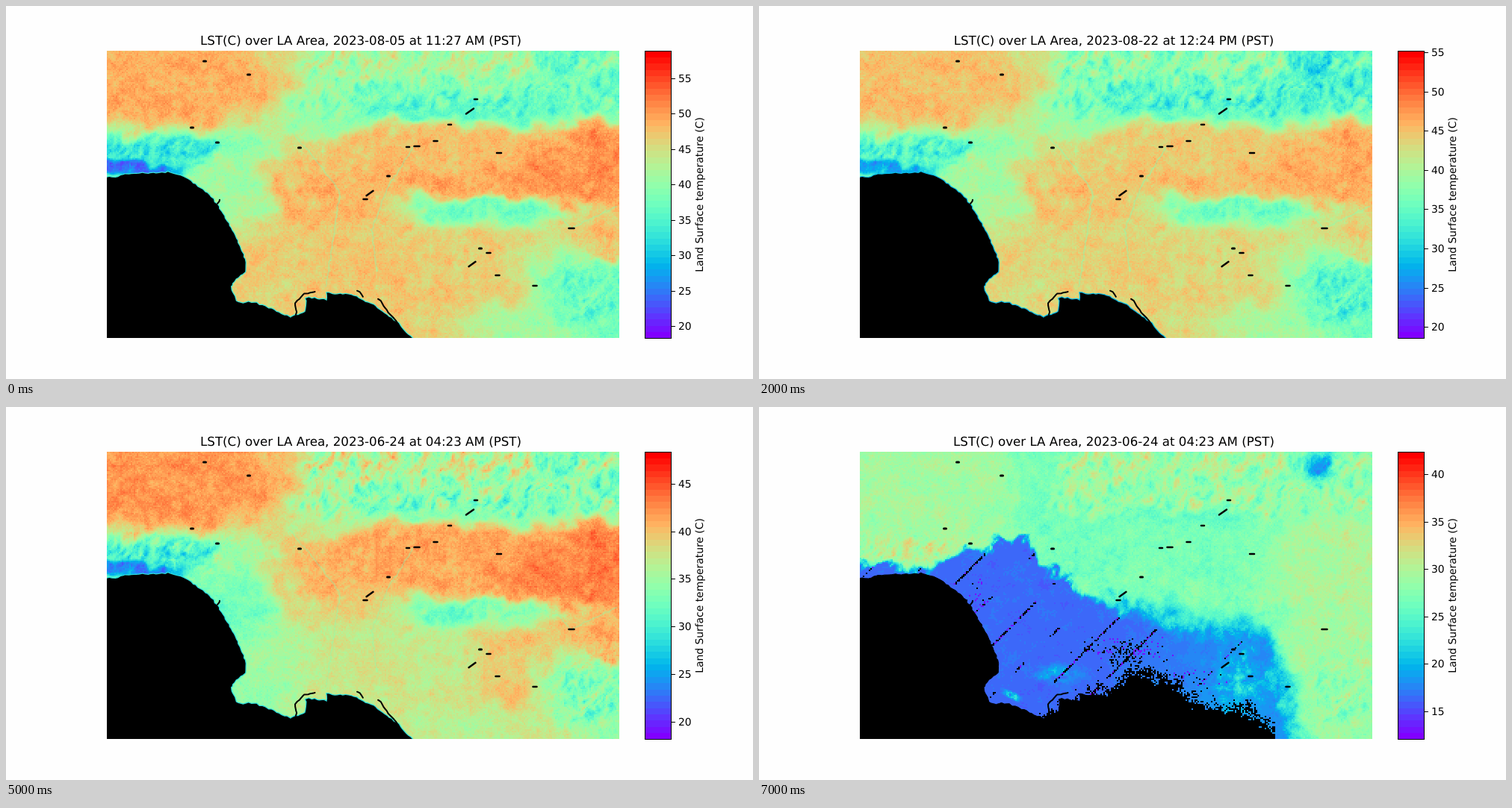
Animation, 1000 px wide and 500 px high, one loop 8 s. Source, as an HTML page with a canvas:

```html
<!DOCTYPE html>
<html lang="en">
<head>
<meta charset="utf-8">
<title>Land surface temperature</title>
<style>
html, body { margin: 0; width: 100%; height: 100%; overflow: hidden; background: #fefefe; }
canvas { position: absolute; left: 135px; top: 60px; }
svg { position: absolute; left: 0; top: 0; }
text { font: 13.89px "DejaVu Sans", sans-serif; text-rendering: geometricPrecision; }
#title { font-size: 16.67px; }
</style>
</head>
<body>
<canvas id="map" width="686" height="385"></canvas>
<svg width="1000" height="500">
  <text id="title" x="475" y="52" text-anchor="middle"></text>
  <g id="bar" shape-rendering="crispEdges"></g>
  <rect x="855.5" y="60.5" width="35" height="385" fill="none" stroke="#000"/>
  <g id="ticks"></g>
  <text id="label" text-anchor="middle">Land Surface temperature (C)</text>
</svg>
<script>
const LEFT = 135, TOP = 60, WIDTH = 686, HEIGHT = 385, CELL = 2, BANDS = 46, HOLD = 1000;
const cols = Math.ceil(WIDTH / CELL), rows = Math.ceil(HEIGHT / CELL);
const $ = id => document.getElementById(id);
const clamp = v => Math.max(0, Math.min(1, v));
const smooth = v => (v = clamp(v), v * v * (3 - 2 * v));
const ramp = (v, from, to) => smooth((v - from) / (to - from));
const lerp = (a, b, k) => a + (b - a) * k;

// ---- colour scale and noise ----
function rainbow(t) {
  t = Math.round(clamp(t) * (BANDS - 1)) / (BANDS - 1);
  return [Math.abs(2 * t - .5), Math.sin(Math.PI * t), Math.cos(Math.PI * t / 2)]
    .map(c => Math.round(255 * clamp(c)));
}
const css = t => `rgb(${rainbow(t)})`;

function hash(x, y) {
  let h = Math.imul(x, 374761393) + Math.imul(y, 668265263) | 0;
  h = Math.imul(h ^ h >>> 13, 1274126177);
  return ((h ^ h >>> 16) >>> 0) / 4294967296;
}
function noise(x, y) {
  const i = Math.floor(x), j = Math.floor(y), u = smooth(x - i), v = smooth(y - j);
  return lerp(lerp(hash(i, j), hash(i + 1, j), u), lerp(hash(i, j + 1), hash(i + 1, j + 1), u), v);
}
// Layered noise around zero
const fbm = (x, y) => noise(x, y) * .55 + noise(x * 2.1 + 31, y * 2.1) * .3 + noise(x * 4.3, y * 4.3 + 57) * .15 - .5;
const bump = (x, y, cx, cy, rx, ry) => Math.exp(-(((x - cx) / rx) ** 2) - ((y - cy) / ry) ** 2);

function curve(points, x) {
  let i = 1;
  while (i < points.length - 1 && points[i][0] < x) i++;
  const [x0, y0] = points[i - 1], [x1, y1] = points[i];
  return lerp(y0, y1, clamp((x - x0) / (x1 - x0)));
}

// ---- terrain: centre, radii, day and night warmth of the main districts ----
const districts = [
  [255, 108, 85, 38, .76, .68], [420, 138, 45, 24, .53, .61], [520, 78, 110, 14, .57, .78],
  [510, 112, 45, 10, .5, .92], [610, 138, 110, 12, .43, .62], [752, 75, 16, 15, .45, .3],
  [765, 118, 50, 20, .46, .78], [220, 188, 80, 14, .36, .5], [160, 217, 45, 6, .12, .56],
  [305, 235, 30, 50, .57, .48], [435, 250, 55, 42, .74, .65], [560, 190, 110, 18, .73, .66],
  [605, 238, 50, 11, .77, .65], [650, 272, 75, 13, .47, .53], [775, 215, 60, 38, .81, .68],
  [800, 320, 28, 18, .74, .66], [490, 350, 130, 48, .71, .48], [785, 385, 48, 38, .47, .77],
  [715, 425, 40, 18, .56, .49]
];

const cells = Array.from({ length: cols * rows }, (_, n) => {
  const i = n % cols, j = Math.floor(n / cols), x = LEFT + i * CELL, y = TOP + j * CELL;
  const warp = fbm(x / 38, y / 30), warp2 = fbm(x / 34 + 80, y / 30 + 9);
  const wx = x + warp * 60, wy = y + warp2 * 36;
  let sum = 0, day = 0, night = 0;
  for (const [cx, cy, rx, ry, d, k] of districts) {
    const w = (((wx - cx) / rx) ** 2 + ((wy - cy) / ry) ** 2 + .3) ** -2.6;
    sum += w;
    day += w * d;
    night += w * k;
  }
  const hills = clamp(ramp(wy, 155, 128) * ramp(wx, 360, 420) + bump(x, y, 210, 192, 110, 26)
    + bump(x, y, 785, 380, 60, 60) + .5 * bump(x, y, 650, 268, 90, 24));
  const bend = warp * 30;
  const ridge = .65 * fbm((x + y * .7 + bend) / 8, (x - y) / 19)
    + .45 * fbm((x - y * .6 - bend) / 9 + 40, (x + y) / 18);
  const town = .6 * fbm(x / 8, y / 8) + .6 * fbm(x / 24, y / 20 + 50);
  const grain = hash(i + 900, j + 77) - .5;
  const street = (i % 9 === 0 || j % 9 === 0) && hash(i >> 3, j >> 3) > .35 ? 1 : 0;
  return { x, y, day: day / sum, night: night / sum, hills, ridge, town, grain, street, warp2 };
});

// ---- warmth rules, 0 to 1; NaN means no data ----
const noon = c => c.day;
const night = c => c.night;
const late = c => .22 + .63 * c.day - .13 * c.hills * ramp(c.x, 360, 420) - .14 * bump(c.x, c.y, 752, 90, 32, 32);

function breezy({ x, y, day, hills }) {
  const sea = .12 * ramp(y, 190, 310) * ramp(x, 700, 580) + .09 * ramp(x, 440, 310) * ramp(y, 175, 225);
  return .17 + .82 * day - sea - .05 * hills;
}

// Clouds fan out from the cape in rays
function cloudy({ x, y, hills, warp2, ridge }) {
  const a = Math.atan2(x - 310, 420 - y), r = Math.hypot(x - 310, 420 - y);
  const cover = fbm(a * 13 + 5, r / 42) + .09 * ramp(a, .35, -.2) - .1 * bump(x, y, 275, 112, 55, 45)
    - .35 * ramp(a, .72, 1.05) - .25 * ramp(r, 60, 25);
  const bank = Math.max(...[[485, 364, 80, 30], [470, 396, 50, 20], [562, 299, 38, 18], [470, 322, 38, 11]]
    .map(([cx, cy, rx, ry]) => 1 - Math.hypot((x - cx) / rx, (y - cy) / ry))) + fbm(x / 22, y / 7) * .6;
  if (cover > .13 || bank > 0) return NaN;
  const wisp = fbm(a * 42, r / 75);
  return .28 + .15 * ramp(x, 390, 600) + .06 * ramp(y, 290, 330) * ramp(x, 700, 660)
    - .09 * hills + warp2 * .14 + wisp * .12 + ridge * .05
    - (.16 + wisp * .6) * bump(x, y, 660, 125, 90, 42)
    - .16 * ramp(cover, .04, .13) - .12 * ramp(bank, -.12, 0);
}

const front = [[135, 214], [230, 212], [285, 187], [360, 178], [374, 212], [440, 246], [540, 262], [680, 278], [821, 300]];
const fogEdge = [[372, 420], [430, 389], [470, 375], [492, 348], [520, 346], [560, 375], [600, 400], [660, 406], [692, 430]];

function foggy({ x, y, hills, warp2, ridge, town, grain, day }) {
  const land = .47 + .09 * hills + .08 * ramp(x, 390, 300) + .1 * ramp(x, 640, 740) * (1 - hills)
    + (day - .6) * .12 - .34 * bump(x, y, 750, 78, 22, 22);
  const depth = Math.min(y - curve(front, x), 700 + (y - 300) * .3 - x) + warp2 * 50 + ridge * 34;
  const fog = ramp(depth, -8, lerp(8, 42, ramp(x, 380, 560)));
  const across = x + y, along = x - y;
  const glow = .15 * bump(x, y, 398, 357, 24, 10) + .36 * bump(across, along, 725, -49, 14, 20)
    * ramp(Math.abs(y - 386 - (x - 339) * .5), 7, 2) + .12 * bump(x, y, 640, 365, 28, 34);
  const sea = .135 + .05 * ramp(x, 450, 640) + glow * (1 + town * 3) + town * .05 + grain * .012;
  if (x > 372 && x < 691 && y > curve(fogEdge, x) + grain * 24 + town * 45) return NaN;
  if (fog > .8) {
    const stripe = (across - 497) % 66;
    if (stripe >= 0 && stripe < 3 && across < 960 && noise(along / 45, across >> 5) > .42 && grain > -.22)
      return grain > .3 ? .02 : NaN;
    const speck = .4 * bump(x, y, 490, 328, 35, 13) + .1 * bump(x, y, 290, 250, 16, 16) + .14 * bump(x, y, 550, 365, 40, 14);
    if (grain + .5 < speck) return town > 0 ? NaN : .03;
  }
  return lerp(land, sea, fog);
}
const mix = (a, b, k) => c => lerp(a(c), b(c), k);

// range: coldest and hottest value; rim: shore tint; relief: contrast of the hills
const scenes = [
  { date: "2023-08-05 at 11:27 AM", range: [18.31, 58.9], heat: noon, relief: .42, river: .4, rim: .35 },
  { date: "2023-07-02 at 01:06 AM", range: [5.67, 27.05], heat: night, relief: .42, rim: .45 },
  { date: "2023-08-22 at 12:24 PM", range: [18.6, 55.2], heat: mix(noon, late, .5), relief: .5, river: .45, rim: .27 },
  { date: "2023-08-26 at 10:50 AM", range: [18.9, 51.42], heat: late, relief: .55, river: .45, rim: .2 },
  { date: "2023-06-28 at 02:45 AM", range: [5.08, 25.82], heat: cloudy, relief: .2, grid: .03 },
  { date: "2023-06-24 at 04:23 AM", range: [18.16, 48.38], heat: breezy, relief: .6, river: .35, rim: .33, grid: .012 },
  { date: "2023-07-06 at 11:29 PM", range: [5.9, 27.6], heat: mix(night, noon, .15), relief: .42, rim: .45 },
  { date: "2023-06-24 at 04:23 AM", range: [12.09, 42.36], heat: foggy, relief: .45, calm: true }
];

// ---- shore and water ----
const shore = [
  [120, 230], [150, 229], [160, 225], [220, 223], [238, 228], [270, 251], [284, 268], [305, 304], [320, 340],
  [320, 356], [303, 371], [301, 379], [310, 398], [332, 397], [380, 417], [401, 410], [402, 391], [430, 394],
  [430, 385], [462, 387], [495, 402], [525, 426], [550, 451]
];
const channels = [
  [[389, 414], [387, 398], [400, 385], [418, 382]], [[471, 382], [480, 391]], [[499, 393], [526, 428]],
  [[287, 260], [281, 268]]
];
const rivers = [
  [[380, 165], [420, 213], [447, 250], [428, 380]], [[545, 190], [510, 245], [490, 300], [497, 360]],
  [[738, 278], [757, 298], [821, 267]]
];
// x, y, length of each lake
const lakes = [
  [266, 74, 3], [325, 92, 3], [249, 163, 3], [283, 183, 3], [393, 190, 3], [481, 259, 5], [487, 251, 9],
  [512, 228, 3], [538, 189, 4], [550, 188, 7], [575, 181, 5], [594, 159, 4], [621, 141, 10], [629, 125, 4],
  [660, 197, 6], [757, 298, 7], [635, 325, 3], [646, 331, 5], [624, 346, 9], [658, 361, 5], [708, 375, 5]
];

// Breaks each side into short, slightly uneven steps
function rough(points) {
  return points.slice(1).flatMap(([x, y], i) => {
    const [px, py] = points[i], n = Math.ceil(Math.hypot(x - px, y - py) / 4);
    return Array.from({ length: n }, (_, k) => [
      lerp(px, x, k / n) + hash(i, k) * 2 - 1, lerp(py, y, k / n) + hash(k, i + 50) * 2 - 1
    ]);
  });
}
const sea = [...rough(shore), [550, 460], [120, 460]];

function line(g, points, width) {
  g.beginPath();
  points.forEach(([x, y]) => g.lineTo(x, y));
  g.lineWidth = width;
  g.stroke();
}

function paint(s) {
  const raw = new OffscreenCanvas(cols, rows), rg = raw.getContext("2d");
  const img = rg.createImageData(cols, rows);
  cells.forEach((c, n) => {
    const base = s.heat(c);
    const rough = s.calm && base < .22 ? 0
      : c.hills * c.ridge * s.relief + (1 - c.hills) * (c.town * .16 + c.ridge * .05)
        + c.grain * .045 + c.street * (s.grid || -.01);
    img.data.set([...(isNaN(base) ? [0, 0, 0] : rainbow(base + rough)), 255], n * 4);
  });
  rg.putImageData(img, 0, 0);

  const out = new OffscreenCanvas(WIDTH, HEIGHT), g = out.getContext("2d");
  g.imageSmoothingEnabled = false;
  g.drawImage(raw, 0, 0, cols * CELL, rows * CELL);
  g.translate(-LEFT, -TOP);
  g.lineJoin = g.lineCap = "round";
  if (s.river) {
    g.globalAlpha = s.river;
    g.strokeStyle = css(.5);
    rivers.forEach(r => line(g, rough(r), 2));
    g.globalAlpha = 1;
  }
  g.strokeStyle = s.rim ? css(s.rim) : "#000";
  line(g, sea, s.rim ? 2.5 : 1);
  g.fill();
  g.strokeStyle = "#000";
  channels.forEach(c => line(g, rough(c), 2));
  lakes.forEach(([x, y, size]) => {
    const tilt = size > 7 ? size * .35 : 0;
    line(g, [[x - size / 2, y + tilt], [x, y], [x + size / 2, y - tilt]], size > 3 ? 2.5 : 3);
  });
  return out;
}

// ---- page ----
const pictures = scenes.map(paint);
const map = $("map").getContext("2d");

$("bar").innerHTML = Array.from({ length: BANDS }, (_, i) => {
  const h = HEIGHT / BANDS;
  return `<rect x="855" y="${TOP + HEIGHT - (i + 1) * h}" width="35" height="${h + .5}" fill="${css(i / (BANDS - 1))}"/>`;
}).join("");

function show(n) {
  const { date, range: [min, max] } = scenes[n];
  const step = max - min < 25 ? 2.5 : 5, digits = step % 1 ? 1 : 0;
  map.drawImage(pictures[n], 0, 0);
  $("title").textContent = `LST(C) over LA Area, ${date} (PST)`;
  let ticks = "";
  for (let v = Math.ceil(min / step) * step; v < max; v += step) {
    const y = Math.round(TOP + HEIGHT * (max - v) / (max - min));
    ticks += `<path d="M891 ${y + .5}h5" stroke="#000"/><text x="900" y="${y + 5}">${v.toFixed(digits)}</text>`;
  }
  $("ticks").innerHTML = ticks;
  $("label").setAttribute("transform", `translate(${digits ? 946 : 933} 253) rotate(-90)`);
}

let current = -1;
const start = performance.now();
function tick() {
  const n = Math.floor((performance.now() - start) / HOLD) % scenes.length;
  if (n !== current) show(current = n);
  requestAnimationFrame(tick);
}
tick();
</script>
</body>
</html>
```
